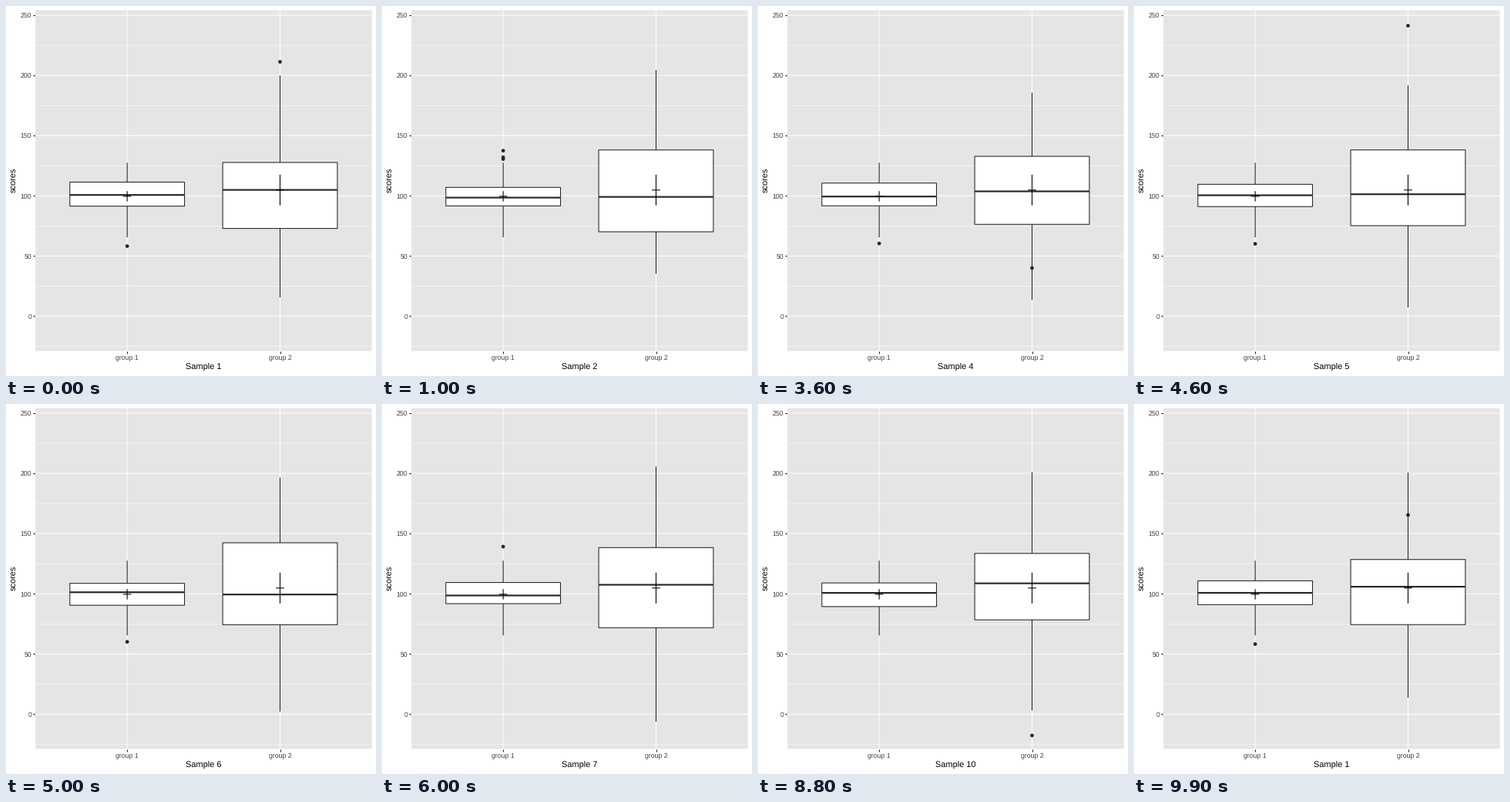
A matplotlib script for the animation above (10000 ms loop, 480x480 px).

```python
import matplotlib.pyplot as plt
import numpy as np
from matplotlib.animation import FuncAnimation
from matplotlib.patches import Rectangle

plt.rcParams["font.family"] = "Liberation Sans"
plt.rcParams["path.snap"] = False
plt.rcParams["text.hinting"] = "none"

SIZE, DPI = 480, 100
PT = 72 / DPI                      # points per pixel
LEFT, TOP, RIGHT, BOTTOM = 38.2, 5.5, 474.5, 447.5
ZERO_Y, UNIT = 402.4, 1.5616       # pixel row of score 0, pixels per score
UNIT_X = (RIGHT - LEFT) / 2.2
INK, AXIS_TEXT, PANEL = "#262626", "#3f3f3f", "#e5e5e5"
LINE = 1.07 * PT
SAMPLES, HOLD, CYCLE = 10, 5, 10   # each sample: rest, then move on in 5 steps

# Key poses by phase (samples elapsed); everything between is linear.
# Group 1 hinges and median, then group 2 from whisker bottom to top.
KEYS = {
    0:   (91.4, 100.7, 111.4, 15.6, 72.9, 104.9, 127.7, 200.0),
    1:   (91.6, 98.5, 107.0, 35.2, 70.1, 99.1, 138.1, 204.5),
    3.2: (91.7, 99.4, 110.6, 13.7, 76.3, 103.7, 132.8, 185.6),
    5:   (90.5, 101.3, 108.7, 2.2, 74.3, 99.4, 142.4, 196.5),
    6:   (91.8, 98.6, 109.4, -6.3, 71.8, 107.5, 138.4, 205.8),
    7.4: (89.3, 99.5, 111.0, -6.0, 72.2, 105.1, 139.1, 192.7),
    9:   (89.4, 101.2, 108.4, 6.1, 80.4, 109.9, 131.7, 203.7),
}
REACH = 65.5, 127.5                # whisker ends of the narrow group 1
OUTLIERS = [
    {0: [58.2], 1: [137.5, 132, 130.5], 3: [60.4], 5: [60.1], 6: [139.2], 7: [136.5]},
    {0: [211.3], 3: [-10.3], 4: [241.3], 9: [-17.7]},
]
MEANS = [(99.6, 4.3), (104.8, 12.8)]   # mean and its error


def score(y):
    return (ZERO_Y - y) / UNIT


def label(x, y, text, size, color="black", **kw):
    """Text with its baseline at a pixel position measured from the top left."""
    return fig.text(x / SIZE, 1 - y / SIZE, text, fontsize=size * PT,
                    color=color, va="baseline", **kw)


def pose(phase):
    """Bottom, lower hinge, median, upper hinge and top for both groups."""
    row = [np.interp(phase, list(KEYS), column, period=SAMPLES)
           for column in zip(*KEYS.values())]
    return (REACH[0], *row[:3], REACH[1]), row[3:]


def blend_points(a, b, t):
    """Move outliers from a to b; an empty side rests at the other's mean."""
    if t == 0 or not (a or b):
        return np.array(a)
    a = a or [np.mean(b)]
    b = b or [np.mean(a)]
    n = max(len(a), len(b))
    return (1 - t) * np.resize(a, n) + t * np.resize(b, n)


class Box:
    def __init__(self, x):
        self.x = x
        # dots are tiny round-capped strokes, so they move in parts of a pixel
        self.dots = self.stroke(4.8 * PT, 3, "round")
        self.whisker = self.stroke(LINE, 4)
        self.body = ax.add_patch(Rectangle((x - 0.375, 0), 0.75, 1, fc="white",
                                           ec=INK, lw=LINE, zorder=5))
        self.median = self.stroke(2 * LINE, 6)

    def stroke(self, width, z, cap="butt"):
        return ax.plot([], [], color=INK, lw=width, zorder=z, solid_capstyle=cap)[0]

    def update(self, stats, points):
        low, lower, mid, upper, high = stats
        self.dots.set_data([self.x] * 3 * len(points),
                           [y for p in points for y in (p - 0.02, p + 0.02, np.nan)])
        self.whisker.set_data([self.x] * 2, [low, high])
        self.body.set_y(lower)
        self.body.set_height(upper - lower)
        self.median.set_data([self.x - 0.375, self.x + 0.375], [mid, mid])


fig = plt.figure(figsize=(SIZE / DPI, SIZE / DPI), dpi=DPI, facecolor="white")
ax = fig.add_axes([LEFT / SIZE, 1 - BOTTOM / SIZE,
                   (RIGHT - LEFT) / SIZE, (BOTTOM - TOP) / SIZE], facecolor=PANEL)
ax.set(xlim=(0.4, 2.6), ylim=(score(BOTTOM), score(TOP)),
       xticks=[1, 2], yticks=range(0, 251, 50))
ax.set_autoscale_on(False)
ax.spines[:].set_visible(False)
ax.tick_params(length=2.74 * PT, width=LINE, color=INK,
               labelleft=False, labelbottom=False)

for v in range(-25, 250, 50):
    ax.axhline(v, color="white", lw=LINE / 2, zorder=1)
for v in range(0, 251, 50):
    ax.axhline(v, color="white", lw=LINE, zorder=2)
    label(33.3, ZERO_Y - v * UNIT + 3.2, str(v), 8.8, AXIS_TEXT, ha="right")

boxes = []
arm = 5.3 / UNIT_X
for x, (mean, err) in enumerate(MEANS, 1):
    ax.axvline(x, color="white", lw=LINE, zorder=2)
    label(LEFT + (x - 0.4) * UNIT_X, 459, f"group {x}", 8.8, AXIS_TEXT, ha="center")
    boxes.append(Box(x))
    for xs, ys in (([x, x], [mean - err, mean + err]),
                   ([x - arm, x + arm], [mean, mean])):
        ax.plot(xs, ys, color="black", lw=LINE, solid_capstyle="butt", zorder=7)

label(13.5, 225.8, "scores", 11, ha="center", rotation=90, rotation_mode="anchor")
title = label((LEFT + RIGHT) / 2, 472, "", 11, ha="center")


def draw(i):
    k, step = divmod(i, CYCLE)
    nxt = (k + 1) % SAMPLES
    t = max(0, step - HOLD) / (CYCLE - HOLD)
    for box, stats, dots in zip(boxes, pose(k + t), OUTLIERS):
        box.update(stats, blend_points(dots.get(k, []), dots.get(nxt, []), t))
    title.set_text(f"Sample {(k if t < 0.5 else nxt) + 1}")
    return []


anim = FuncAnimation(fig, draw, frames=SAMPLES * CYCLE, interval=100,
                     repeat=True, repeat_delay=0, blit=False)
plt.show()
```
